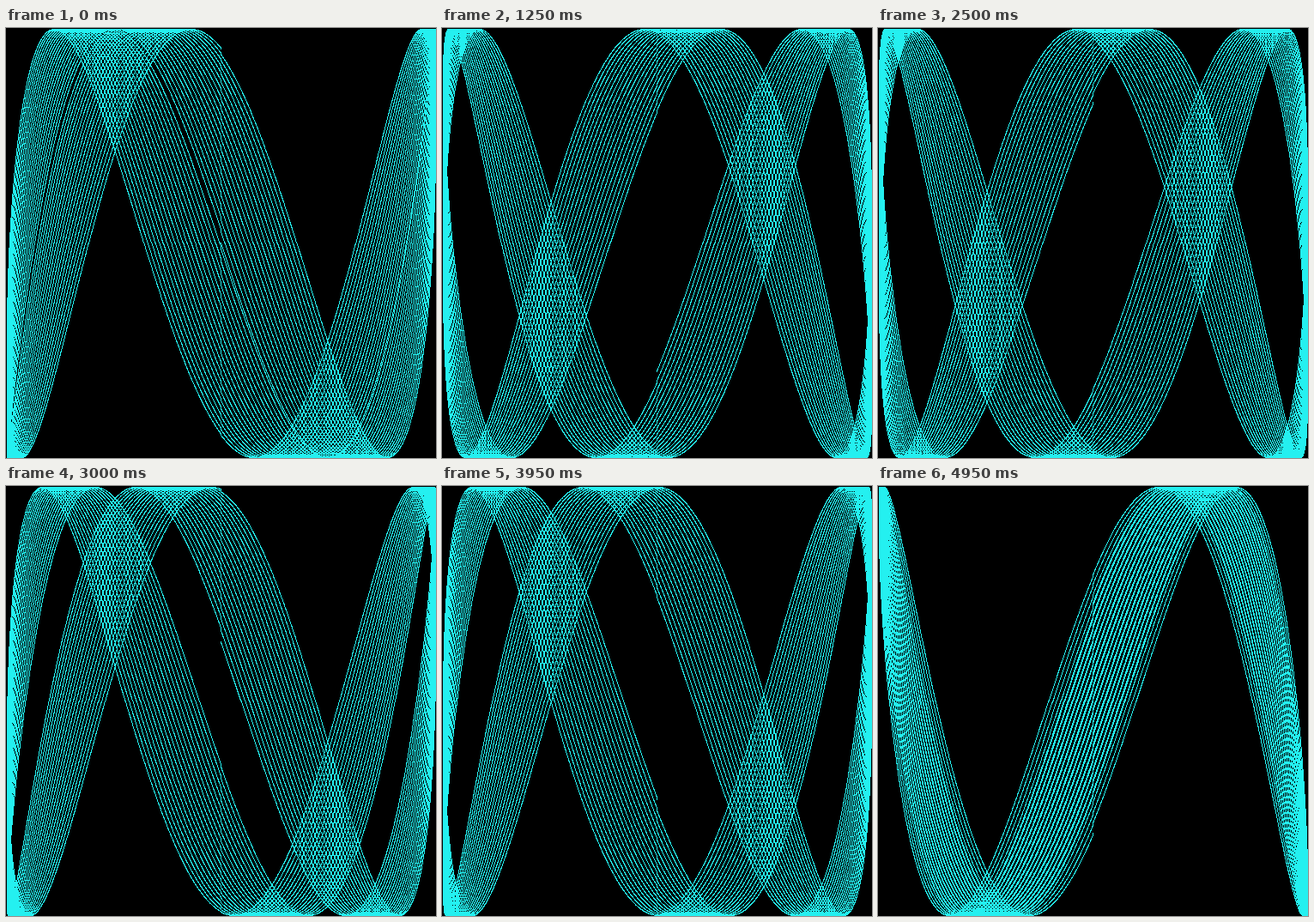
Animation of 501 by 501 pixels, one loop 5 s. Source, as an HTML page with a canvas:

```html
<!DOCTYPE html>
<html lang="en">
<head>
<meta charset="utf-8">
<title>Lissajous</title>
<style>
html, body { margin: 0; width: 100%; height: 100%; overflow: hidden; background: #000; }
canvas { display: block; }
</style>
</head>
<body>
<canvas id="stage" width="501" height="501"></canvas>
<script>
const SIZE = 250, SIDE = 2 * SIZE + 1;
const CYCLES = 20, STEP = 0.001, END = CYCLES * 2 * Math.PI;
const FREQ = 3 - 1.138 / END;   // just under 3:1, so the curve never closes
const FRAMES = 100, DELAY = 50, PHASE_STEP = 0.1;

const ctx = document.getElementById('stage').getContext('2d');
const image = ctx.createImageData(SIDE, SIDE);
const pixels = new Uint32Array(image.data.buffer);

function rgb(r, g, b) {
  return new Uint32Array(new Uint8Array([r, g, b, 255]).buffer)[0];
}
const BACK = rgb(0, 0, 0), LINE = rgb(36, 240, 240);

// Rounds toward zero after the half-pixel offset
const toPixel = v => SIZE + Math.trunc(v * SIZE + 0.5);

const count = Math.ceil(END / STEP);
const columns = new Uint16Array(count);
for (let i = 0; i < count; i++) columns[i] = toPixel(Math.sin(i * STEP));

function draw(frame) {
  const phase = frame * PHASE_STEP;
  pixels.fill(BACK);
  for (let i = 0; i < count; i++) {
    const row = toPixel(Math.sin(i * STEP * FREQ + phase));
    pixels[row * SIDE + columns[i]] = LINE;
  }
  ctx.putImageData(image, 0, 0);
}

const start = performance.now();
let shown = 0;
draw(0);

function tick() {
  const elapsed = Math.max(0, performance.now() - start);
  const frame = Math.floor(elapsed / DELAY) % FRAMES;
  if (frame !== shown) {
    shown = frame;
    draw(frame);
  }
  requestAnimationFrame(tick);
}
requestAnimationFrame(tick);
</script>
</body>
</html>
```
